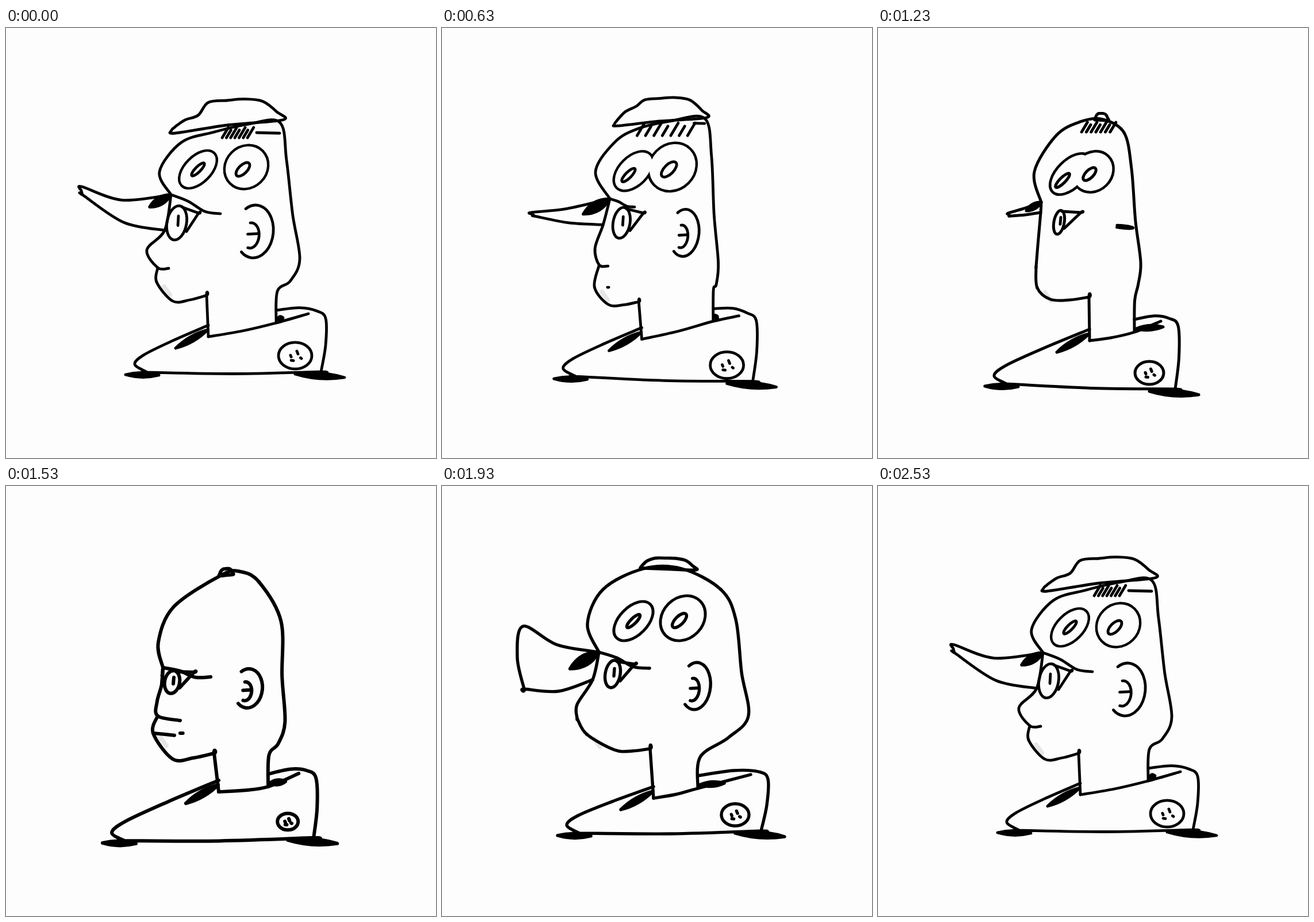
An HTML page with a canvas for the animation above (2.56 s loop, 748 by 748 pixels).

```html
<!DOCTYPE html>
<html lang="en">
<head>
<meta charset="utf-8">
<title>Shifting head</title>
<style>
  html, body { margin: 0; width: 100%; height: 100%; overflow: hidden; background: #fdfdfd; }
  canvas { display: block; width: 100vw; height: 100vh; }
</style>
</head>
<body>
<canvas id="stage" width="748" height="748"></canvas>
<script>
const ctx = document.getElementById('stage').getContext('2d');
const PAPER = '#fdfdfd', INK = '#000';
const LOOP = 2560, STEP = 100 / 3;
const KEYS = [0, 370, 870, 1230, 1530, 1930, 2530];
const N = KEYS.length - 1;
const TILT = -Math.PI / 4, ARC = 2.18;

// Each joint has one place (or size) per key pose; all lines are built from these.
const skull = {
  bridge: [287,290, 290,296, 293,298, 284,303, 273,316, 273,289],
  front:  [267,250, 267,250, 267,250, 272,250, 265,272, 253,240],
  temple: [305,199, 300,203, 303,192, 310,187, 292,210, 280,180],
  crown:  [362,181, 345,187, 340,164, 352,163, 375,155, 350,144],
  rear:   [476,164, 468,160, 445,156, 428,182, 440,167, 485,180],
  back:   [488,230, 479,218, 458,230, 441,245, 478,235, 511,232],
  jaw:    [511,402, 492,405, 471,410, 457,408, 485,410, 533,400]
};
const face = {
  under:  [276,352, 278,358, 282,326, 283,321, 271,345, 262,337],
  cheek:  [245,386, 251,386, 277,380, 278,378, 263,375, 235,380],
  tuck:   [264,417, 270,409, 275,415, 275,415, 264,400, 235,404],
  lip:    [283,418, 305,412, 275,416, 275,416, 303,408, 235,405],
  chin:   [262,442, 257,445, 274,455, 277,452, 256,430, 252,432],
  bottom: [290,475, 288,488, 292,474, 300,472, 290,475, 300,459],
  throat: [349,465, 335,484, 353,469, 367,468, 362,465, 362,457],
  mouth:  [0, 0, 0, 0, 37, 0],
  dimple: [0, 49, 0, 0, 47, 0]
};
const nose = {
  tipTop: [132,276, 139,305, 178,328, 226,322, 272,328, 141,244],
  tipLow: [133,290, 145,313, 182,334, 229,327, 272,332, 143,353],
  sag:    [17, 6, 3, 1, 0, 12],
  patch:  [43, 45, 60, 30, 0, 58],
  brow:   [373,323, 378,327, 293,298, 284,303, 356,332, 361,317]
};
// x, y and the two radii
const organs = {
  eyeL:   [334,246,38,21, 331,251,35,21, 335,247,43,25, 335,254,42,22, 320,255,0,0, 333,235,39,22],
  eyeR:   [418,242,38,34, 409,243,41,35, 392,241,43,39, 374,250,36,31, 385,255,0,0, 419,230,40,33],
  eyeLow: [297,339,17,30, 304,340,16,28, 317,338,13,26, 315,338,9,21, 289,341,13,20, 297,327,13,24],
  ear:    [432,354,33,46, 427,357,32,45, 418,355,20,34, 426,346,18,2, 421,352,25,34, 441,348,26,41],
  look:   [0, 3, 13, 14, 5, 0]
};
const hat = {
  brim:   [288,178, 285,175, 325,162, 377,160, 371,156, 345,143],
  capEnd: [481,160, 472,158, 444,155, 401,161, 395,154, 441,146],
  height: [43, 43, 33, 12, 11, 19],
  bill:   [1, 1, 0, 0, 0, 0],
  hair:   [376,420,191,18, 338,425,190,18, 342,428,184,25, 354,404,181,17, 380,380,154,0, 395,395,144,0]
};
const shirt = {
  tip:    [224,585, 214,587, 208,598, 202,605, 184,603, 217,590],
  heel:   [548,598, 546,602, 533,625, 517,628, 535,612, 555,600],
  corner: [556,505, 551,503, 541,515, 522,518, 539,508, 567,510],
  neckF:  [352,537, 342,537, 356,545, 368,544, 370,532, 368,543],
  neckB:  [470,513, 477,505, 463,518, 446,529, 456,523, 445,526],
  shade:  [12, 6, 10, 50, 30, 46],
  badge:  [29, 29, 29, 25, 18, 24],
  pen:    [4.8, 4.8, 4.8, 5, 6, 5.4]
};
const joints = { ...skull, ...face, ...nose, ...organs, ...hat, ...shirt };

// Tangent that never overshoots, so a turning point rests at its key.
function slope(a, b, c, ta, tb) {
  const l = (b - a) / ta, r = (c - b) / tb;
  return l * r <= 0 ? 0 : 2 * l * r / (l + r);
}

function sample(track, t) {
  const k = Math.max(0, KEYS.slice(0, N).findLastIndex(key => t >= key));
  const size = track.length / N;
  const span = i => KEYS[(i + N) % N + 1] - KEYS[(i + N) % N];
  const h = span(k), u = Math.min(1, (t - KEYS[k]) / h), v = 1 - u;
  return Array.from({ length: size }, (_, i) => {
    const [p, a, b, n] = [-1, 0, 1, 2].map(d => track[(k + d + N) % N * size + i]);
    const m0 = slope(p, a, b, span(k - 1), h), m1 = slope(a, b, n, h, span(k + 1));
    return v * v * (1 + 2 * u) * a + u * u * (3 - 2 * u) * b + h * u * v * (v * m0 - u * m1);
  });
}

const off = (p, dx, dy) => [p[0] + dx, p[1] + dy];
const mix = (p, q, u, dx = 0, dy = 0) =>
  [p[0] + (q[0] - p[0]) * u + dx, p[1] + (q[1] - p[1]) * u + dy];
const dist = (p, q) => Math.hypot(q[0] - p[0], q[1] - p[1]);

// Smooth line through the points; a point given twice is a corner.
function curve(pts, loop) {
  const n = pts.length;
  const at = i => loop ? pts[(i + n) % n] : pts[Math.max(0, Math.min(n - 1, i))];
  ctx.beginPath();
  ctx.moveTo(...pts[0]);
  for (let i = 0; i < (loop ? n : n - 1); i++) {
    const [a, b, c, d] = [at(i - 1), at(i), at(i + 1), at(i + 2)];
    ctx.bezierCurveTo(b[0] + (c[0] - a[0]) / 6, b[1] + (c[1] - a[1]) / 6,
      c[0] - (d[0] - b[0]) / 6, c[1] - (d[1] - b[1]) / 6, ...c);
  }
  if (loop) ctx.closePath();
  ctx.stroke();
}

function oval(x, y, a, b, tilt = 0, sweep = Math.PI) {
  if (a < 1) return;
  ctx.beginPath();
  ctx.ellipse(x, y, a, b, tilt, -sweep, sweep);
  ctx.stroke();
}

function lens(p, q, fat) {
  const d = dist(p, q) || 1, nx = (p[1] - q[1]) / d * fat, ny = (q[0] - p[0]) / d * fat;
  ctx.beginPath();
  ctx.moveTo(...p);
  ctx.quadraticCurveTo(...mix(p, q, 0.5, nx, ny), ...q);
  ctx.quadraticCurveTo(...mix(p, q, 0.5, -nx, -ny), ...p);
  ctx.fill();
  ctx.stroke();
}

function drawEyes({ eyeL, eyeR, look: [look], pen: [pen] }) {
  // Inking both before clearing lets overlapping eyes merge.
  ctx.lineWidth = pen * 1.8;
  oval(...eyeL, TILT);
  oval(...eyeR, TILT);
  ctx.fillStyle = PAPER;
  for (const [x, y, a, b] of [eyeL, eyeR]) {
    ctx.beginPath();
    ctx.ellipse(x, y, a, b, TILT, 0, 2 * Math.PI);
    ctx.fill();
  }
  ctx.fillStyle = INK;
  ctx.lineWidth = pen;
  const pupil = ([x, y, a, b], dx, dy) => oval(x + dx, y + dy, a * 0.4, b * 0.22, TILT);
  pupil(eyeL, -look, look * 0.8);
  pupil(eyeR, -6, 4);
}

function drawSkull({ bridge, front, temple, crown, rear, back, jaw, neckB, brow }) {
  const wide = jaw[0] - neckB[0];
  curve([bridge, front, temple, crown,
    mix(crown, rear, 0.5, 0, -9 - (rear[1] - crown[1]) / 4),
    rear, back, mix(back, jaw, 0.55, -2), jaw,
    [neckB[0] + wide * 0.6, jaw[1] + 38],
    [neckB[0] + wide * 0.05, neckB[1] - 55], neckB]);
  curve([bridge, mix(bridge, brow, 0.35), mix(bridge, brow, 0.68, 0, dist(bridge, brow) * 0.07), brow]);
}

function drawFace({ bridge, under, cheek, tuck, lip, chin, bottom, throat, neckF,
  mouth: [mouth], dimple: [dimple], pen: [pen] }) {
  ctx.strokeStyle = '#e6e6e6';
  ctx.lineWidth = 8;
  curve([off(chin, 13, 8), off(chin, 23, 22)]);
  ctx.strokeStyle = INK;
  ctx.lineWidth = pen;
  curve([bridge, under, cheek, tuck, lip]);
  curve([tuck, chin, bottom, mix(bottom, throat, 0.5, 0, 3), throat, throat, neckF]);
  curve([chin, off(chin, mouth, mouth / 10)]);
  curve([off(chin, dimple, 0), off(chin, dimple * 1.1, 0)]);
}

function drawNose({ bridge, under, tipTop, tipLow, sag: [sag], patch: [patch] }) {
  curve([bridge, mix(bridge, tipTop, 0.55, 0, sag), tipTop,
    mix(tipTop, tipLow, 0.5, -dist(tipTop, tipLow) / 10), tipLow, tipLow,
    mix(tipLow, under, 0.5, 0, sag), under]);
  lens(bridge, off(bridge, -0.87 * patch, 0.5 * patch), patch * 0.3);
}

function drawSideOrgans({ eyeLow: [x, y, a, b], ear: [ex, ey, ea, eb] }) {
  oval(x, y, a, b, 0.18);
  const point = [x + 38, y - 17];
  curve([[x + a * 0.6, y - b * 0.9], point, point, [x + a, y + b * 0.5]]);
  curve([[x + 3, y - b * 0.4], [x + 2, y + b * 0.15]]);
  oval(ex, ey, ea, eb, 0.1, ARC);
  oval(ex - ea * 0.2, ey + eb * 0.15, ea * 0.45, eb * 0.48, 0.1, ARC * 0.8);
  curve([[ex - ea * 0.35, ey + eb * 0.1], [ex + ea * 0.22, ey + eb * 0.08]]);
}

function drawHat({ brim, capEnd, rear, height: [height], bill: [bill], hair: [x0, x1, y, len] }) {
  const dome = [0.03, 0.12, 0.24, 0.33, 0.5, 0.65, 0.82, 0.95].map(u => {
    const rise = (1 - (2 * u - 1) ** 4) * (u < 0.3 ? 1 - 0.45 * bill : 1);
    return mix(brim, capEnd, u, 0, -height * rise);
  });
  curve([brim, ...dome, capEnd, mix(brim, capEnd, 0.5), off(brim, 6, 5 * bill)], true);
  curve([off(rear, -40 * bill, 18 * bill), off(rear, 0, 19 * bill)]);
  for (let i = 0; i < 7; i++) {
    const x = x0 + (x1 - x0) * i / 6, s = len * (i % 2 ? 0.75 : 1);
    curve([[x, y], [x + s * 0.6, y - s]]);
  }
}

function drawShirt({ tip, heel, corner, neckF, neckB, shade: [shade], badge: [r] }) {
  const peak = off(neckF, 0, -20), nape = off(neckB, 0, -22);
  const toe = off(tip, 22, 14), turn = off(corner, -16, -13);
  curve([peak, mix(peak, tip, 0.48, 0, -6), mix(peak, tip, 0.87, 0, -8), tip, toe, toe,
    mix(toe, heel, 0.5, 0, 3), heel, heel,
    mix(heel, corner, 0.5, 4), corner, turn, mix(nape, turn, 0.58, 0, -5), nape]);
  curve([neckF, mix(neckF, neckB, 0.5, 0, 2), neckB, off(corner, -30, -8)]);

  lens(off(neckF, -57, 20), off(neckF, -1, -12), 9);
  lens(off(neckB, 3, -6), off(neckB, shade, -9), 8);
  lens(off(tip, -16, 18), off(tip, 42, 19), 8);
  lens(off(heel, -45, 4), off(heel, 41, 10), 10);

  const [x, y] = off(heel, -45, -28);
  oval(x, y, r, r * 0.8);
  const dash = (a, b, c, d) => curve([[x + a * r, y + b * r], [x + c * r, y + d * r]]);
  dash(0.1, -0.28, 0.17, -0.1);
  dash(-0.28, -0.03, -0.24, 0.07);
  dash(-0.24, 0.28, -0.1, 0.3);
  dash(0.32, 0.13, 0.38, 0.17);
}

function draw(t) {
  const pose = {};
  for (const name in joints) pose[name] = sample(joints[name], t);
  ctx.fillStyle = PAPER;
  ctx.fillRect(0, 0, 748, 748);
  ctx.fillStyle = ctx.strokeStyle = INK;
  ctx.lineCap = ctx.lineJoin = 'round';
  for (const part of [drawEyes, drawSkull, drawFace, drawNose, drawSideOrgans, drawHat, drawShirt]) part(pose);
}

let start;
function tick(now) {
  start ??= now;
  const t = (now - start) % LOOP;
  draw(Math.floor((t + 3.4) / STEP) * STEP);
  requestAnimationFrame(tick);
}
draw(0);
requestAnimationFrame(tick);
</script>
</body>
</html>
```
